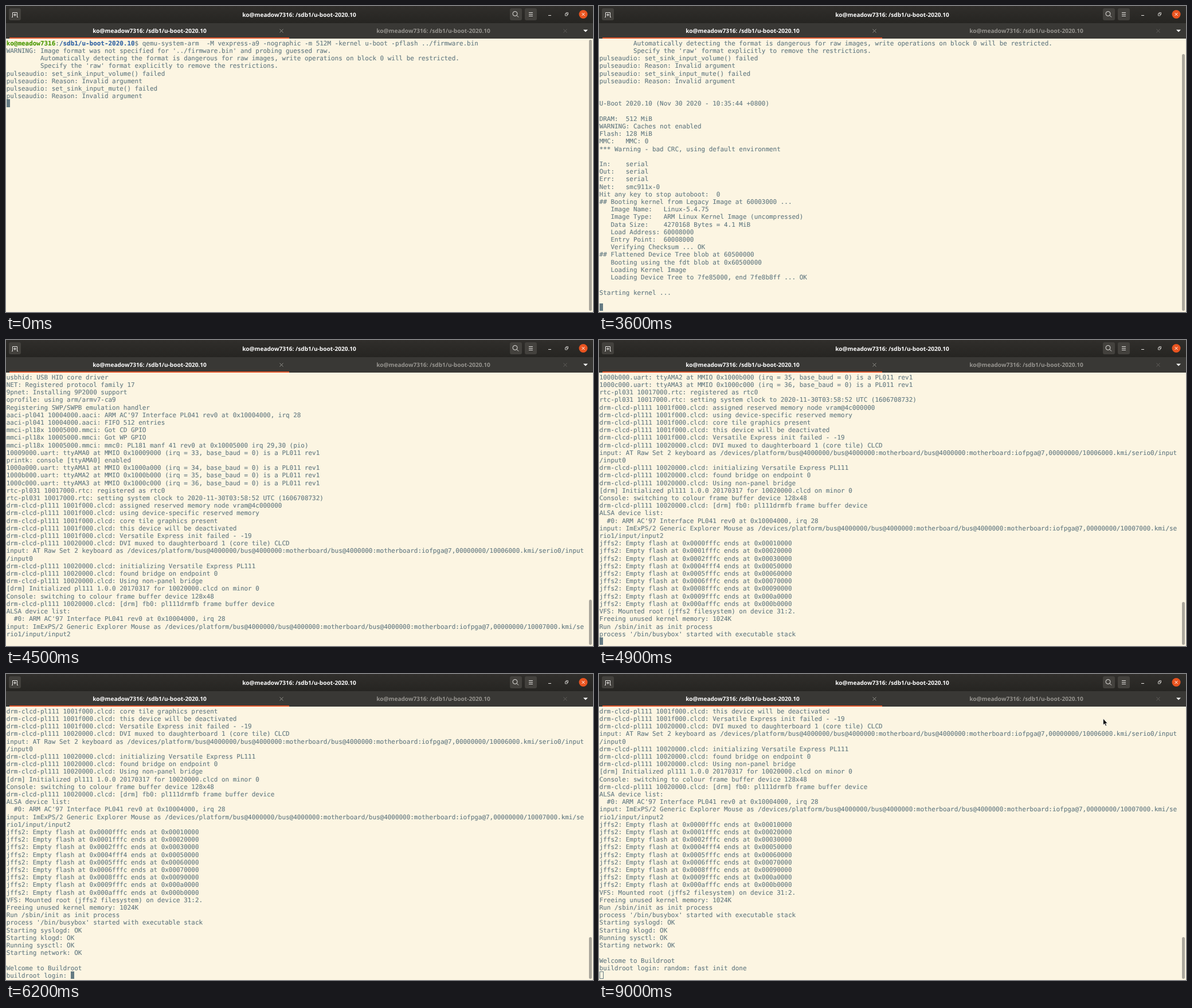
An HTML page for the animation above (9.2 s loop, 1024 by 535 pixels).

```html
<!DOCTYPE html>
<html lang="en">
<head>
<meta charset="utf-8">
<title>Terminal</title>
<style>
  html, body { margin: 0; width: 100%; height: 100%; overflow: hidden; background: #fcf5e2; }
  body { position: relative; text-rendering: geometricPrecision; }
  svg, pre, #cursor, #thumb { position: absolute; }
  svg { left: 0; top: 0; }
  svg text { font: bold 10.1px "Open Sans", sans-serif; text-anchor: middle; }
  pre {
    left: .7px; top: 58.8px; margin: 0; color: #657b83;
    font: 10.95px/13.2px "DejaVu Sans Mono", monospace;
    -webkit-text-stroke: .15px;
  }
  pre b { color: #4e9a06; }
  pre b + b { color: #3465a4; }
  #cursor { width: 6.6px; height: 13.6px; box-sizing: border-box; background: #657b83; }
  #cursor.hollow { width: 7.5px; background: none; border: 1px solid #657b83; }
  #thumb { left: 1017px; width: 5px; border-radius: 3px; background: #aaa69b; }
</style>
</head>
<body>
<pre id="screen"></pre>
<div id="cursor"></div>
<div id="thumb"></div>
<svg width="1024" height="535" fill="none" stroke="#e8e6e3">
  <defs>
    <linearGradient id="bar" x2="0" y2="1">
      <stop stop-color="#302e2b"/><stop offset="1" stop-color="#262522"/>
    </linearGradient>
  </defs>
  <g stroke="none">
    <path fill="url(#bar)" d="M0 0H1024V30H0z"/>
    <path fill="#393835" d="M0 30H1024V57H0z"/>
    <path fill="#e0562b" d="M6 55H494V57H6z"/>
    <g fill="#43413d">
      <rect x="5" y="4" width="21" height="21" rx="3"/>
      <rect x="879" y="4" width="21" height="21" rx="3"/>
      <rect x="905" y="4" width="21" height="21" rx="3"/>
    </g>
    <circle cx="1007" cy="14.5" r="7.5" fill="#e95420"/>
    <path fill="#fff" d="M1007 41.5h8l-4 4z"/>
    <g fill="#fff">
      <text class="title" x="511.5" y="18.5"></text>
      <text class="title" x="250.5" y="47"></text>
      <text class="title" x="745.5" y="47" fill="#96948f"></text>
    </g>
  </g>
  <path d="M10 19.500h1.500v-8h8v8h1.500M15.500 13v5M13 15.500h5"/>
  <circle cx="888" cy="13.500" r="4"/>
  <path d="M891 16.500l3 3M912 11.500h7M912 14.500h7M912 17.500h7M946 16.500h5"/>
  <path stroke-width=".8" d="M975.500 13.500h3.500v3.500h-3.500zM977 13v-1.500h3.500v3.500h-1.500"/>
  <path stroke="#fff" d="M1004.500 12l5 5m0-5l-5 5"/>
  <path stroke="#96948f" d="M477.500 40.500l6 6m0-6l-6 6"/>
  <path stroke="#62605c" d="M972.500 40.500l6 6m0-6l-6 6"/>
  <path id="pointer" fill="#111" stroke="#fff" stroke-width=".6" d="M0 0V11L2.500 8.800L4.200 12.800L6 12L4.300 8.200H7.500z"/>
</svg>
<script>
const LOOP = 9200, COLS = 153, ROWS = 36, LINE = 13.2, CHAR = 6.592, TOP = 58;
const user = 'ko@meadow7316', path = '/sdb1/u-boot-2020.10';
const prompt = `${user}:${path}$`;
const $ = id => document.getElementById(id);

const uart = (n, irq) => `1000${n}000.uart: ttyAMA${'9abc'.indexOf(n)} at MMIO 0x1000${n}000 (irq = ${irq}, base_baud = 0) is a PL011 rev1`;
const clcd = (addr, text) => `drm-clcd-pl111 ${addr}.clcd: ${text}`;
const device = 'as /devices/platform/bus@4000000/bus@4000000:motherboard/bus@4000000:motherboard:iofpga@7,00000000/';
const hex = n => '0x' + n.toString(16).padStart(8, '0');
const emptyFlash = block => {
  const start = block * 0x10000 + (block === 4 ? 0xfff4 : 0xfffc);
  return `jffs2: Empty flash at ${hex(start)} ends at ${hex((block + 1) * 0x10000)}`;
};

// Terminal output: [time in ms, text]
const output = [
  [0, `${prompt} qemu-system-arm  -M vexpress-a9 -nographic -m 512M -kernel u-boot -pflash ../firmware.bin
WARNING: Image format was not specified for '../firmware.bin' and probing guessed raw.
         Automatically detecting the format is dangerous for raw images, write operations on block 0 will be restricted.
         Specify the 'raw' format explicitly to remove the restrictions.
pulseaudio: set_sink_input_volume() failed
pulseaudio: Reason: Invalid argument
pulseaudio: set_sink_input_mute() failed
pulseaudio: Reason: Invalid argument
`],
  [200, `

U-Boot 2020.10 (Nov 30 2020 - 10:35:44 +0800)

DRAM:  512 MiB
WARNING: Caches not enabled
Flash: 128 MiB
`],
  [300, `MMC:   MMC: 0
*** Warning - bad CRC, using default environment

In:    serial
Out:   serial
Err:   serial
Net:   smc911x-0
Hit any key to stop autoboot:  2 `],
  [1300, '\b\b1 '],
  [2300, '\b\b0 '],
  [2400, '\n'],
  [2500, `## Booting kernel from Legacy Image at 60003000 ...
   Image Name:   Linux-5.4.75
   Image Type:   ARM Linux Kernel Image (uncompressed)
   Data Size:    4270168 Bytes = 4.1 MiB
   Load Address: 60008000
   Entry Point:  60008000
   Verifying Checksum ... OK
## Flattened Device Tree blob at 60500000
   Booting using the fdt blob at 0x60500000
   Loading Kernel Image
   Loading Device Tree to 7fe85000, end 7fe8b8ff ... OK

Starting kernel ...

`],
  // Early kernel messages scroll past unseen
  [4100, '\n'.repeat(130) + `libphy: Fixed MDIO Bus: probed
libphy: smsc911x-mdio: probed
smsc911x 4e000000.ethernet eth0: MAC Address: 52:54:00:12:34:56
isp1760 4f000000.usb: bus width: 32, oc: digital
isp1760 4f000000.usb: NXP ISP1760 USB Host Controller
isp1760 4f000000.usb: new USB bus registered, assigned bus number 1
isp1760 4f000000.usb: Scratch test failed.
isp1760 4f000000.usb: can't setup: -19
isp1760 4f000000.usb: USB bus 1 deregistered
usbcore: registered new interface driver usb-storage
ledtrig-cpu: registered to indicate activity on CPUs
usbcore: registered new interface driver usbhid
usbhid: USB HID core driver
NET: Registered protocol family 17
9pnet: Installing 9P2000 support
oprofile: using arm/armv7-ca9
Registering SWP/SWPB emulation handler
aaci-pl041 10004000.aaci: ARM AC'97 Interface PL041 rev0 at 0x10004000, irq 28
aaci-pl041 10004000.aaci: FIFO 512 entries
mmci-pl18x 10005000.mmci: Got CD GPIO
mmci-pl18x 10005000.mmci: Got WP GPIO
mmci-pl18x 10005000.mmci: mmc0: PL181 manf 41 rev0 at 0x10005000 irq 29,30 (pio)
${uart('9', 33)}
printk: console [ttyAMA0] enabled
${uart('a', 34)}
${uart('b', 35)}
${uart('c', 36)}
rtc-pl031 10017000.rtc: registered as rtc0
rtc-pl031 10017000.rtc: setting system clock to 2020-11-30T03:58:52 UTC (1606708732)
${clcd('1001f000', 'assigned reserved memory node vram@4c000000')}
${clcd('1001f000', 'using device-specific reserved memory')}
${clcd('1001f000', 'core tile graphics present')}
${clcd('1001f000', 'this device will be deactivated')}
${clcd('1001f000', 'Versatile Express init failed - -19')}
${clcd('10020000', 'DVI muxed to daughterboard 1 (core tile) CLCD')}
`],
  [4300, `input: AT Raw Set 2 keyboard ${device}10006000.kmi/serio0/input/input0
`],
  [4500, `${clcd('10020000', 'initializing Versatile Express PL111')}
${clcd('10020000', 'found bridge on endpoint 0')}
${clcd('10020000', 'Using non-panel bridge')}
[drm] Initialized pl111 1.0.0 20170317 for 10020000.clcd on minor 0
Console: switching to colour frame buffer device 128x48
${clcd('10020000', '[drm] fb0: pl111drmfb frame buffer device')}
ALSA device list:
  #0: ARM AC'97 Interface PL041 rev0 at 0x10004000, irq 28
input: ImExPS/2 Generic Explorer Mouse ${device}10007000.kmi/serio1/input/input2
`],
  [4800, [0, 1, 2, 4, 5, 6, 8, 9, 10].map(emptyFlash).join('\n') + '\n'],
  [4900, `VFS: Mounted root (jffs2 filesystem) on device 31:2.
Freeing unused kernel memory: 1024K
Run /sbin/init as init process
process '/bin/busybox' started with executable stack
`],
  [5300, 'Starting syslogd: OK\n'],
  [5500, 'Starting klogd: OK\n'],
  [5700, 'Running sysctl: OK\n'],
  [5800, 'Starting network: OK\n'],
  [6000, '\nWelcome to Buildroot\nbuildroot login: '],
  [6500, 'random: fast init done\n'],
];

const wrapLine = line => line.match(new RegExp(`.{1,${COLS}}`, 'g')) || [''];

function rowsAt(t) {
  const text = output.filter(([time]) => time <= t).map(([, s]) => s).join('');
  return text.replace(/..[\b]{2}/g, '').split('\n').flatMap(wrapLine);
}

function draw(t) {
  const rows = rowsAt(t), visible = rows.slice(-ROWS);
  $('screen').innerHTML = visible.join('\n').replace(prompt, `<b>${user}</b>:<b>${path}</b>$`);

  const focused = t < 7800, cursor = $('cursor');
  cursor.className = focused ? '' : 'hollow';
  cursor.hidden = focused && Math.floor(t / 600) % 2 === 1;
  cursor.style.left = .7 + visible.at(-1).length * CHAR + 'px';
  cursor.style.top = TOP - .4 + (visible.length - 1) * LINE + 'px';

  const height = 474 * Math.min(1, ROWS / rows.length);
  $('thumb').style.top = 533 - height + 'px';
  $('thumb').style.height = height + 'px';

  const p = (t - 8100) / 900;
  $('pointer').setAttribute('visibility', p < 0 ? 'hidden' : 'visible');
  $('pointer').setAttribute('transform', `translate(${890 - 10.5 * Math.min(p, 1)} ${10.5 + 67.5 * Math.min(p, 1)})`);
}

for (const title of document.querySelectorAll('.title')) title.textContent = `${user}: ${path}`;

let shown = -1;
(function frame() {
  const t = Math.floor(performance.now() % LOOP / 100) * 100;
  if (t !== shown) draw(shown = t);
  requestAnimationFrame(frame);
})();
</script>
</body>
</html>
```
